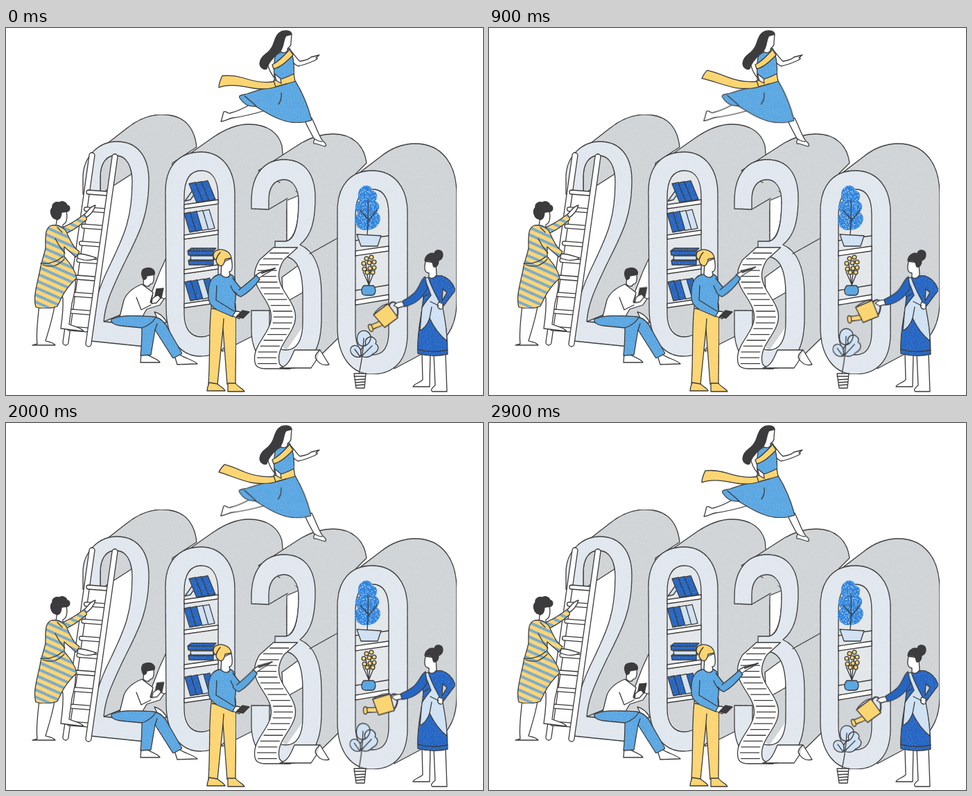
Recreate the animation shown at these times as an HTML page. Size 688 px wide and 530 px high, loop 3 s.

```html
<!DOCTYPE html>
<html lang="en">
<head>
<meta charset="utf-8">
<title>2030</title>
<style>
html, body { margin: 0; width: 100%; height: 100%; overflow: hidden; background: #fff; }
svg { position: absolute; left: 0; top: 0; width: 688px; height: 530px; }
.back { will-change: transform; }
path, ellipse, circle { stroke: #3b3b3c; stroke-width: 1.3; stroke-linejoin: round; stroke-linecap: round; fill: none; }
.front { fill: #e1e7ee; }
.side { fill: #d0d4d7; }
.inner { fill: #e4e7ea; }
.w { fill: #fff; }
.k { fill: #3c3c3e; }
.y { fill: #fcd573; }
.b { fill: #5ba7e2; }
.d { fill: #2666c3; }
.l { fill: #cfe1f3; }
.tree { fill: #2f80da; }
.striped { fill: url(#stripes); }
.n { stroke: none; }
.grain { filter: url(#grain); }
.stipple { filter: url(#stipple); }
.sway { animation: 1.5s cubic-bezier(.37, 0, .63, 1) infinite alternate; }
.scarf { animation-name: scarf; }
.skirt { animation-name: skirt; transform-origin: 402px 78px; }
.leg { animation-name: leg; transform-origin: 375px 112px; }
.pen { animation-name: pen; transform-origin: 338px 381px; }
.plant { animation-name: plant; transform-origin: 510px 500px; }
.phone { animation-name: phone; }
.can, .arm { animation: can 3s cubic-bezier(.65, 0, .35, 1) infinite; transform-origin: 562px 396px; }
.arm { animation-name: arm; transform-origin: 604px 366px; }
@keyframes scarf {
  from { d: path("M388 77 C375 80 357 77 342 72 C332 69 321 68 312 69 C309 75 307 81 307 86 C322 80 342 84 357 87 C370 89 382 88 392 84 Z"); }
  to { d: path("M388 77 C375 78 358 76 344 70 C333 65 325 60 316 57 C312 60 309 63 307 66 C320 73 338 83 354 86 C369 88 382 88 392 84 Z"); }
}
@keyframes skirt { to { transform: rotate(1.2deg); } }
@keyframes leg { to { transform: rotate(1.2deg); } }
@keyframes pen { to { transform: translateX(-4px) rotate(-3deg); } }
@keyframes plant { to { transform: rotate(-1.5deg) scaleY(1.07); } }
@keyframes phone { to { transform: translate(1px, -2px); } }
@keyframes can {
  0%, 3%, 100% { transform: translate(-2px, 4px) rotate(-22deg); }
  51%, 57% { transform: none; }
}
@keyframes arm {
  0%, 3%, 100% { transform: rotate(-6deg); }
  51%, 57% { transform: none; }
}
</style>
</head>
<body>
<svg class="back" viewBox="0 0 688 530">
  <defs>
    <filter id="grain" x="0" y="0" width="1" height="1" color-interpolation-filters="sRGB">
      <feTurbulence type="fractalNoise" baseFrequency=".7" numOctaves="2" seed="4"/>
      <feColorMatrix values="0 0 0 0 1  0 0 0 0 1  0 0 0 0 1  .9 0 0 0 -.5"/>
      <feComposite in2="SourceAlpha" operator="in" result="dots"/>
      <feMerge><feMergeNode in="SourceGraphic"/><feMergeNode in="dots"/></feMerge>
    </filter>
    <filter id="stipple" color-interpolation-filters="sRGB">
      <feTurbulence type="fractalNoise" baseFrequency=".55" numOctaves="2" seed="9"/>
      <feColorMatrix values="0 0 0 0 .62  0 0 0 0 .82  0 0 0 0 .97  5 0 0 0 -2.5"/>
      <feComposite in2="SourceAlpha" operator="in" result="dots"/>
      <feMerge><feMergeNode in="SourceGraphic"/><feMergeNode in="dots"/></feMerge>
    </filter>
    <pattern id="stripes" width="20" height="9.5" patternUnits="userSpaceOnUse" patternTransform="rotate(24)">
      <rect width="20" height="9.5" fill="#fcd573"/><rect width="20" height="4" fill="#79a9c9"/>
    </pattern>
  </defs>

  <g class="grain">
    <!-- 2 -->
    <path class="side" d="M124 184 L174 145 C190 132 206 125 225 125 C258 125 272 145 275 172 L240 195 L231 332 C224 346 219 358 214 372 L204 398 L141 424 Z"/>
    <path class="w n" d="M111 240 L136 240 V216 C136 196 144 184 158 184 C174 184 182 200 182 222 C182 275 170 300 152 338 L124 440 L100 440 Z"/>
    <path class="side" d="M136 240 V216 C136 196 144 184 158 184 C171 184 180 195 181 211 Z"/>
    <path class="side" d="M141 424 L231 390 L236 430 L200 440 Z"/>
    <path class="front" d="M111 240 V214 C112 185 134 164 160 164 C190 164 206 186 206 220 C206 275 190 300 168 345 C150 383 143 400 141 424 L200 430 V460 L122 452 C124 400 135 372 152 338 C170 300 182 275 182 222 C182 200 174 184 158 184 C144 184 136 196 136 216 V240 Z"/>

    <!-- first 0 -->
    <path class="side" d="M243 197 L300 157 C318 145 333 139 350 139 C378 139 393 152 398 170 L405 250 V420 L312 467 Z"/>
    <path class="front" d="M230 236 C230 198 251 179 281 179 C312 179 330 204 330 240 V420 C330 455 310 474 280 474 C250 474 231 446 231 405 Z"/>
    <path class="inner" d="M257 244 C257 220 265 206 282 206 C298 206 306 220 306 244 V412 C306 434 298 446 282 446 C266 446 257 434 257 412 Z"/>
    <path class="side n" d="M258 400 L292 391 L300 404 V436 C288 450 260 450 258 412 Z"/>
    <g id="books"></g>

    <!-- 3 -->
    <path class="side" d="M364 206 L426 166 C442 157 456 153 472 153 C500 153 517 170 520 195 L500 215 L479 260 V448 L440 486 L420 320 L425 240 Z"/>
    <path class="side n" d="M379 262 V240 L400 219 L422 240 V262 L405 308 V262 Z"/>
    <path class="w" d="M405 249 L422 242 C423 280 418 302 405 308 Z"/>
    <path d="M379 262 L406 246"/>
    <path class="side n" d="M386 330 H415 L429 380 V430 L404 466 L380 440 Z"/>
    <path class="w" d="M398 360 L424 341 C428 354 428 366 428 382 L400 398 Z"/>
    <path class="front" d="M354 261 V250 C354 212 372 190 401 190 C430 190 446 210 446 245 C446 280 440 300 424 313 C445 322 455 345 455 385 V420 C455 465 438 492 405 492 C375 492 356 475 354 440 V408 H380 V438 C382 455 390 465 404 465 C420 465 428 450 428 425 V385 C428 350 420 330 400 330 H388 V308 H404 C416 306 422 285 422 250 C422 232 414 219 401 219 C387 219 379 230 379 248 V262 Z"/>
    <path d="M438 326 L479 303"/>

    <!-- last 0 -->
    <path class="side" d="M490 224 L540 186 C556 173 572 167 590 167 C630 167 650 198 650 240 V395 C650 425 640 445 620 460 L560 492 Z"/>
    <path class="front" d="M478 264 C478 226 498 206 528 206 C560 206 579 230 579 266 V442 C579 480 560 500 528 500 C498 500 478 474 478 432 Z"/>
    <path class="inner" d="M504 270 C504 246 512 233 529 233 C545 233 552 247 552 270 V438 C552 460 545 472 529 472 C512 472 504 460 504 438 Z"/>
    <path class="side n" d="M505 400 L551 390 V436 C551 464 540 471 529 471 C514 471 505 458 505 436 Z"/>
  </g>

  <!-- shelves with plants -->
  <path class="w" d="M504 322 L552 315 V322 L504 329 Z M504 393 L552 385 V392 L504 400 Z"/>
  <path d="M504 307 L552 300 M504 379 L552 371"/>
  <path class="n tree stipple" d="M513 230 C520 225 528 228 528 235 C537 236 536 246 533 250 C541 254 538 263 535 266 C543 272 540 282 533 288 C524 294 510 293 506 286 C500 279 504 270 508 268 C501 261 504 252 510 250 C506 242 508 234 513 230 Z"/>
  <path d="M522 247 Q523 275 521 299 M522 276 L511 263 M522 279 L535 263"/>
  <path class="l" d="M506 298 L541 300 L536 315 L512 315 Z"/>
  <path d="M523 372 L519 340 M523 372 L527 336 M523 372 L532 350 M523 370 L515 352"/>
  <g id="buds"></g>
  <path class="b" d="M516 372 H530 C535 378 533 386 527 386 H519 C512 386 511 378 516 372 Z"/>

  <!-- ladder -->
  <g id="ladder"></g>

  <!-- climber -->
  <path class="w" d="M48 400 C46 420 43 440 45 456 L38 458 H71 C67 453 60 453 57 452 C62 435 67 420 70 402 Z M98 352 C103 366 99 382 95 398 L91 428 C98 431 108 432 112 438 L79 434 C81 420 83 405 82 390 L76 372 Z"/>
  <path class="w" d="M74 268 C72 282 74 284 70 289 L82 291 V284 C88 282 89 273 87 264 Z"/>
  <path class="w" d="M112 270 C118 266 120 258 129 256 C127 264 122 270 114 275 Z M104 326 C114 326 121 329 131 332 C122 337 112 336 103 332 Z"/>
  <g class="grain">
    <path class="striped" d="M78 289 C92 285 104 276 113 269 L117 276 C106 286 94 294 83 298 Z"/>
    <path class="striped" d="M66 285 C56 288 57 300 57 318 C54 332 50 340 49 350 C44 372 39 390 43 403 C56 407 68 404 74 402 C80 390 84 378 102 361 C99 347 90 338 84 330 L84 316 L101 331 L106 323 C98 318 93 308 87 294 C82 286 74 284 66 285 Z"/>
  </g>
  <path d="M71 304 C76 314 80 320 85 325 M50 340 C62 341 74 337 82 330 M53 342 C66 347 75 343 84 334 M74 288 L81 295"/>
  <path class="k" d="M69 275 C64 271 63 263 67 259 C66 253 73 250 77 252 C82 249 87 252 88 256 C93 257 93 263 89 265 L80 266 C80 272 78 276 74 277 Z"/>

  <!-- reader -->
  <path class="w" d="M196 370 C186 374 175 380 170 393 L164 417 L196 418 L203 406 L222 400 L228 391 L221 388 L209 397 L212 382 Z"/>
  <path d="M188 389 L195 407 L209 400 M211 386 L208 396"/>
  <path class="w" d="M199 357 L198 370 C203 375 207 373 208 370 C213 370 214 363 213 356 Z"/>
  <path class="k" d="M198 363 C194 355 195 348 202 347 C210 345 216 350 214 356 L203 358 C203 362 201 364 198 363 Z"/>
  <path class="w" d="M214 410 C223 412 228 418 232 425 L222 427 Z M200 470 C206 474 220 478 222 483 H194 L195 470 Z M248 470 C257 477 270 479 276 485 L247 486 L243 473 Z"/>
  <g class="grain">
    <path class="b" d="M153 420 C170 413 195 416 214 417 C222 419 229 424 233 433 L254 470 L241 477 L215 436 L209 472 L194 473 C196 455 196 445 196 433 L165 430 C157 429 149 425 153 420 Z"/>
  </g>
  <path d="M196 433 C205 430 212 425 216 418 M215 436 L218 427"/>

  <!-- paper -->
  <path class="w" id="sheet"/>
  <path class="w" d="M416 465 H453 L466 486 C458 488 452 485 448 479 L440 491 H395 C407 488 411 477 416 465 Z M453 465 C447 470 444 475 448 479"/>
  <path id="rows"/>

  <!-- writer -->
  <g class="grain">
    <path class="y" d="M297 398 C292 420 295 470 292 514 L305 515 L313 434 L319 515 H331 C331 475 333 430 331 398 Z"/>
    <path class="b" d="M308 356 C296 358 291 370 292 388 C292 398 297 402 304 407 L327 417 L331 409 L330 399 C333 385 331 374 330 361 C325 354 316 353 308 356 Z"/>
  </g>
  <path d="M304 372 L303 393 L329 409 M313 434 L314 420 M297 405 L303 406"/>
  <path class="w" d="M311 339 L310 356 C315 362 322 361 323 356 L322 352 C327 352 327 343 325 333 Z"/>
  <path class="y" d="M303 335 C297 332 298 322 305 321 C311 318 324 322 325 332 L316 334 C315 341 312 345 308 343 C304 341 303 338 303 335 Z"/>
  <path d="M309 324 C306 327 304 331 303 335"/>
  <path class="y" d="M293 512 L305 514 C309 518 315 520 316 524 H290 C290 519 292 516 293 512 Z M320 513 H331 C334 518 341 520 344 525 H320 Z"/>
  <path class="w" d="M327 416 L331 409 C337 409 341 411 344 414 L336 420 Z"/>
  <path class="k" d="M332 417 L341 408 L351 410 L342 419 Z"/>

  <!-- gardener -->
  <path class="w" d="M600 470 L601 508 C596 513 588 514 587 518 H611 L612 470 Z M617 470 L619 516 C614 520 612 523 615 525 H636 L634 470 Z"/>
  <g class="grain">
    <path class="d" d="M603 362 C598 368 597 376 602 388 C600 415 592 440 594 470 C608 474 624 474 637 471 C637 445 634 425 629 404 L648 379 C645 367 637 360 626 357 Z"/>
    <path class="l" d="M609 360 C614 376 622 390 630 404 C633 420 636 434 636 452 C626 444 617 432 611 419 C608 428 603 434 597 437 L600 404 C603 398 608 392 613 386 C610 377 606 368 603 362 Z"/>
  </g>
  <path class="w" d="M630 398 L624 396 C620 403 625 408 630 405 Z"/>
  <path class="side" d="M630 377 L636 382 L629 394 Z"/>
  <path d="M611 419 L614 403 M602 388 L610 384 M612 395 L624 401 M594 464 C608 468 624 468 637 465"/>
  <path class="w" d="M605 337 C603 347 603 353 610 354 L610 360 C614 363 618 361 621 357 L620 339 Z"/>
  <path class="k" d="M604 336 C605 326 614 324 618 326 C618 319 630 319 630 327 C630 332 627 335 624 336 C624 342 621 346 617 345 C615 341 616 337 612 336 Z"/>
</svg>

<svg viewBox="0 0 688 530">
  <!-- runner -->
  <path class="w sway leg" d="M353 110 C341 117 331 121 323 123 C320 124 317 119 314 121 C312 127 312 131 310 135 C317 134 321 131 326 130 C341 128 358 124 374 119 Z"/>
  <path class="w" d="M431 134 C436 145 441 154 445 161 C443 165 443 168 447 167 L460 171 C463 170 461 166 458 164 C453 160 450 149 441 130 Z"/>
  <path d="M445 160 C449 163 453 164 456 164"/>
  <g class="sway skirt">
    <path class="b grain" d="M388 82 C374 87 359 91 348 95 C342 97 335 96 337 101 C342 109 350 114 360 113 C370 119 382 127 393 131 C409 138 426 138 441 133 C436 114 428 94 417 76 Z"/>
    <path d="M397 94 C398 101 396 106 393 110 M344 98 C351 104 357 109 361 113"/>
  </g>
  <path class="w" d="M388 36 C380 38 378 47 378 55 C381 65 387 74 397 80 L396 72 C391 66 387 60 387 53 L393 43 Z"/>
  <path class="w" d="M410 32 C416 38 419 44 424 48 C431 47 437 45 440 42 L452 39 L447 43 C450 43 450 45 445 47 C436 51 428 54 421 55 C415 52 411 47 409 41 Z"/>
  <path class="b grain" d="M389 39 C394 36 404 31 409 29 C416 42 415 56 416 69 L387 80 C388 66 384 54 389 39 Z"/>
  <path class="y" d="M409 31 L414 39 C404 50 395 57 386 59 L384 53 C394 48 402 39 409 31 Z"/>
  <path class="y sway scarf" d="M388 77 C375 80 357 77 342 72 C332 69 321 68 312 69 C309 75 307 81 307 86 C322 80 342 84 357 87 C370 89 382 88 392 84 Z"/>
  <path class="y" d="M386 76 C396 75 406 71 415 66 L417 77 C408 80 398 82 389 85 Z"/>
  <path class="w" d="M387 66 L396 73 L397 80 L390 76 Z"/>
  <path class="w" d="M400 12 C397 22 398 28 396 34 C401 38 407 34 406 30 C407 28 412 27 411 21 L412 9 Z"/>
  <path class="k" d="M412 9 C411 3 399 2 393 8 C387 14 387 24 382 30 C377 38 367 40 366 51 C366 57 372 61 376 59 C378 48 390 39 395 34 C402 27 399 18 404 11 Z"/>

  <!-- phone -->
  <g class="sway phone">
    <path class="k" d="M217 377 L227 376 L224 390 L214 391 Z"/>
    <path class="w" d="M211 391 C214 388 217 386 220 386 L223 390 L217 397 L210 398 Z"/>
  </g>

  <!-- writing arm -->
  <path class="b" d="M327 361 C332 368 336 373 340 377 L336 387 C330 384 326 378 324 372"/>
  <g class="sway pen">
    <path class="w" d="M360 357 C368 351 376 349 386 348 C380 353 371 356 364 362 Z"/>
    <path d="M369 354 L388 347" style="stroke-width:2"/>
    <path class="b" d="M336 378 C346 370 354 364 361 357 L366 363 C358 374 348 383 339 388 C335 388 333 384 330 381"/>
  </g>

  <!-- potted sprout -->
  <g class="sway plant">
    <path class="l" d="M513 459 C505 458 504 443 512 438 C520 435 527 441 526 449 C524 456 519 461 513 459 Z M511 475 C500 477 493 466 499 460 C506 455 515 463 511 475 Z M513 474 C509 464 515 460 519 457 C516 449 525 443 531 448 C535 451 534 454 533 456 C540 460 536 468 530 470 C526 475 519 477 513 474 Z"/>
    <path d="M509 500 C512 485 515 473 516 448 M513 474 L528 459 M511 475 L503 464"/>
  </g>
  <path class="w" d="M502 499 H519 L517 520 H505 Z M502 503 H518 M503 508 L518 507 M504 512 L518 511 M504 516 L517 515"/>

  <!-- watering can -->
  <g class="can">
    <path d="M553 397 C557 388 567 390 565 399 C564 407 561 412 558 414" style="stroke-width:2.2"/>
    <path class="y" d="M536 409 C530 411 526 410 519 410 L520 417 C527 416 532 418 537 416 Z"/>
    <ellipse class="y" cx="518" cy="414" rx="2.7" ry="5.5"/>
    <path class="y" d="M529 398 L554 391 L560 415 L537 421 Z"/>
    <path d="M529 398 C535 393 546 389 554 391"/>
  </g>
  <g class="arm">
    <path class="w" d="M571 392 C565 391 560 392 556 396 L562 400 L572 398 Z"/>
    <path class="d" d="M605 359 C598 363 596 374 587 381 C581 386 575 388 569 391 L571 399 C584 398 598 391 607 376 Z"/>
  </g>
</svg>

<script>
const $ = id => document.getElementById(id);
const shape = (cls, d) => `<path class="${cls}" d="${d}"/>`;

// Ladder: both rails lean left on the way down
const rail = (x, y, h) =>
  shape("w", `M${x - 4} ${y} a4 4 0 0 1 8 0 L${x - 34} ${y + h} a4 4 0 0 1 -8 0 Z`);
let rungs = "";
for (let i = 0; i < 9; i++) {
  const y = 237 + i * 24.6, x = 119 - i * 3.5;
  rungs += shape("w", `M${x} ${y - 3} l26 2 a3 3 0 0 1 0 6 l-26 -2 a3 3 0 0 1 0 -6 Z`);
}
$("ladder").innerHTML = rail(124, 184, 270) + rungs + rail(157, 186, 270);

// Books lean by s pixels at the top
const book = (cls, x, y, w, h, s) =>
  shape(cls, `M${x} ${y} l${s} ${-h} l${w} -2 l${-s} ${h} Z`);
const shelf = y => shape("w", `M257 ${y} L306 ${y - 7} v6 L257 ${y + 6} Z`);
const row = (x, y, tones, s) =>
  tones.map((t, i) => book(t, x + i * 9, y - i * 1.3, 9, 27, s)).join("");
const flat = (cls, x, y, w) =>
  shape(cls, `M${x} ${y} l5 -4 h${w} l-4 4 v6 h${-w} Z M${x} ${y} h${w}`);
$("books").innerHTML = [255, 299, 349, 398].map(shelf).join("") +
  book("l", 258, 250, 8, 14, 10) + row(275, 252, ["d", "d", "d"], -11) +
  row(265, 295, ["d", "d", "l", "l"], -8) +
  flat("d", 263, 336, 35) + flat("l", 266, 329, 32) + flat("d", 262, 322, 36) +
  row(266, 394, ["d", "d", "l", "d"], -8);

$("buds").innerHTML = [[520, 333], [527, 331], [516, 340], [524, 339], [531, 338], [517, 348], [525, 347], [531, 346], [521, 353], [529, 353]]
  .map(([x, y]) => `<circle class="y" cx="${x}" cy="${y}" r="2.9"/>`).join("");

// Paper: a wave that flares out at the top
const edge = y => 370.5 - 12 * Math.cos((y - 357) / 60 * Math.PI) + Math.max(0, 335 - y) * .5;
const left = [], right = [], lines = [];
for (let y = 317; y <= 482; y += 3) {
  left.push(`${edge(y)} ${y}`);
  right.unshift(`${edge(y) + 35} ${y}`);
}
for (let y = 325; y < 486; y += 8.4) lines.push(`M${edge(y) + 4} ${y} h27`);
$("sheet").setAttribute("d", `M${left.join("L")} Q360 492 374 492 H410 Q394 490 ${right.join("L")} Z`);
$("rows").setAttribute("d", lines.join(""));
</script>
</body>
</html>
```
